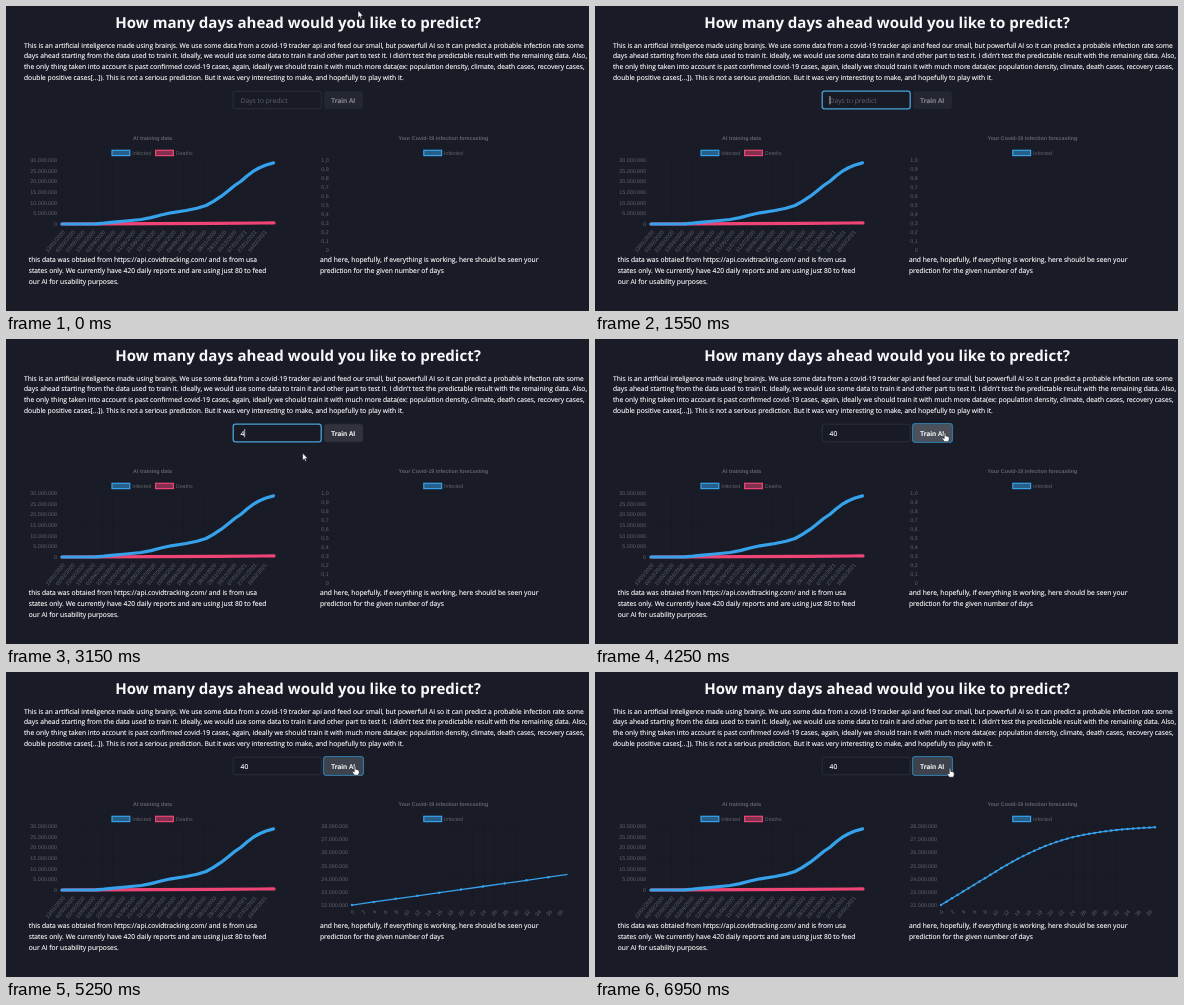
Recreate the animation shown at these times as an HTML page. Size 583 by 305 pixels, loop 7000 ms.

```html
<!DOCTYPE html>
<html lang="en">
<head>
<meta charset="utf-8">
<title>Infection forecast</title>
<style>
  html, body { margin: 0; width: 100%; height: 100%; overflow: hidden; background: #191c27; }
  svg { display: block; width: 583px; height: 305px; text-rendering: geometricPrecision; }
  text { white-space: pre; }
  .copy { font: 6.71px "Open Sans", "Noto Sans", sans-serif; fill: #fff; stroke: #fff; stroke-width: .12; }
  .copy.hint { fill: #62646c; stroke: none; }
  .head { font: 700 15.05px "Open Sans", "Noto Sans", sans-serif; fill: #f8f8fa; }
  .btn { font: 600 6.55px "Open Sans", "Noto Sans", sans-serif; stroke-width: .15; }
  .chart { font: 5.34px "Liberation Sans", Arial, sans-serif; fill: #61636a; }
  .chart .title { font-weight: 700; }
  .end { text-anchor: end; }
  .mid { text-anchor: middle; }
  .line { fill: none; stroke-linejoin: round; stroke-linecap: round; }
  .blue { stroke: #36a2eb; }
  .pink { stroke: #ee4576; }
  .grid { stroke: #000; stroke-opacity: .12; stroke-width: .5; }
  .pointer path { fill: #fff; stroke: #101116; stroke-width: .6; stroke-linejoin: round; }
</style>
</head>
<body>
<svg viewBox="0 0 583 305" xmlns="http://www.w3.org/2000/svg">
  <defs><clipPath id="area"><rect x="343" y="150" width="218.5" height="86"/></clipPath></defs>
  <rect width="583" height="305" fill="#191c27"/>
  <text class="head mid" x="292.1" y="21.6">How many days ahead would you like to predict?</text>
  <g id="copy" class="copy"></g>

  <g id="form">
    <rect id="field" x="227.2" y="85.2" width="88" height="17.6" rx="2.3" fill="#181b25"/>
    <text id="value" class="copy" x="234.6" y="97"></text>
    <rect id="caret" y="90" width=".7" height="8.4" fill="#eee"/>
    <rect id="button" x="318.2" y="85.2" width="38.6" height="17.6" rx="2.3"/>
    <rect id="ring" class="line" x="317.6" y="84.6" width="39.8" height="18.8" rx="2.8" stroke="#34759f" stroke-width="1.3"/>
    <text id="label" class="btn mid" x="337.3" y="96.7">Train AI</text>
  </g>

  <g id="left" class="chart">
    <text class="title mid" x="146.5" y="133.9">AI training data</text>
  </g>
  <g id="right" class="chart">
    <text class="title mid" x="437.4" y="133.9">Your Covid-19 infection forecasting</text>
    <g id="empty"></g>
    <g id="forecast"></g>
    <g id="series" clip-path="url(#area)">
      <path id="curve" class="line blue" stroke-width="1.3"/>
      <g id="dots" fill="#36a2eb"></g>
    </g>
  </g>

  <g id="pointer" class="pointer">
    <path id="arrow" d="M0 0V7.4L1.7 5.9L2.8 8.4L4 7.9L2.9 5.4H5.2Z"/>
    <path id="hand" d="M-.8 .6Q0 -.5 .8 .6V3.2Q1.5 2.8 1.9 3.5Q2.7 3.1 3.1 3.9Q4 3.6 4.2 4.5V6.6L3.4 8.9H-.7L-2.9 5.6Q-2.7 4.5 -1.6 5.2L-.8 5.8Z"/>
    <path id="beam" d="M-1.2 -3.6H1.2M0 -3.6V3.6M-1.2 3.6H1.2"/>
  </g>
</svg>
<script>
const LOOP = 7000;
const $ = id => document.getElementById(id);

function add(parent, tag, attrs, text) {
  const el = document.createElementNS("http://www.w3.org/2000/svg", tag);
  for (const k in attrs) el.setAttribute(k, attrs[k]);
  if (text !== undefined) el.textContent = text;
  return parent.appendChild(el);
}

function set(el, attrs) {
  for (const k in attrs) el.setAttribute(k, attrs[k]);
}

function show(el, on) {
  el.style.display = on ? "" : "none";
}

function lines(x, y, rows) {
  rows.forEach((row, i) => add($("copy"), "text", { x, y: y + i * 10.68 }, row));
}

function legend(parent, x, color, name) {
  add(parent, "rect", {
    x, y: 144.3, width: 17.8, height: 5.3, class: color,
    fill: color === "blue" ? "#36a2eb" : "#ee4576", "fill-opacity": .5, "stroke-width": 1.2
  });
  add(parent, "text", { x: x + 20.2, y: 148.8 }, name);
}

// Tick labels down the side, each with a faint grid line
function yAxis(parent, x, right, gap, names) {
  names.forEach((name, i) => {
    const y = 154 + i * gap;
    add(parent, "path", { class: "grid", d: `M${x + 1.5} ${y}H${right}` });
    add(parent, "text", { x, y: y + 1.9, class: "end" }, name);
  });
}

function xTick(parent, x, bottom, drop, name) {
  add(parent, "path", { class: "grid", d: `M${x} 154V${bottom + 4}` });
  add(parent, "text", {
    class: "end", y: 1.9, transform: `translate(${x + 1.4} ${bottom + drop}) rotate(-50)`
  }, name);
}

const pathOf = pts => "M" + pts.map(p => p.map(v => v.toFixed(2)).join(" ")).join("L");
const millions = n => n ? n + ".000.000" : "0";

// Text blocks
lines(18, 41.6, [
  "This is an artificial inteligence made using brainjs. We use some data from a covid-19 tracker api and feed our small, but powerfull AI so it can predict a probable infection rate some",
  "days ahead starting from the data used to train it. Ideally, we would use some data to train it and other part to test it. I didn't test the predictable result with the remaining data. Also,",
  "the only thing taken into account is past confirmed covid-19 cases, again, ideally we should train it with much more data(ex: population density, climate, death cases, recovery cases,",
  "double positive cases[...]). This is not a serious prediction. But it was very interesting to make, and hopefully to play with it."
]);
lines(22.8, 256.4, [
  "this data was obtaied from https://api.covidtracking.com/ and is from usa",
  "states only. We currently have 420 daily reports and are using just 80 to feed",
  "our AI for usability purposes."
]);
lines(314, 256.4, [
  "and here, hopefully, if everything is working, here should be seen your",
  "prediction for the given number of days"
]);

// Training chart
const left = $("left");
legend(left, 106, "blue", "Infected");
legend(left, 149.6, "pink", "Deaths");
yAxis(left, 51, 268, 10.65, [30, 25, 20, 15, 10, 5, 0].map(millions));
for (let i = 0; i <= 20; i++) {
  const day = new Date(Date.UTC(2020, 0, 13 + i * 20)).toISOString().slice(0, 10);
  xTick(left, 56.2 + i * 10.1, 218, 7, day.split("-").reverse().join("/"));
}
add(left, "path", { class: "line pink", "stroke-width": 3.2, d: "M56 218L95 217.9L150 217.6L210 217.4L268 216.9" });
add(left, "path", {
  class: "line blue", "stroke-width": 3.2,
  d: pathOf([[56, 218], [90, 217.9], [98, 217.2], [108, 216.1], [120, 215], [135, 213.5], [145, 211.6],
    [155, 209], [165, 206.8], [180, 204.5], [191, 202.3], [200, 199.5], [207, 195.7], [215, 190.4],
    [222, 185], [229, 179.3], [235, 175.2], [241, 170], [247, 165.4], [253, 162], [260, 159], [267.5, 156.9]])
});

// Forecast chart
const POINTS = 40, X0 = 346, SPAN = 214, STEP = SPAN / (POINTS - 1), BASE = 233.4;
const knots = [233, 219.6, 206.2, 192.9, 181.3, 172, 165.2, 160.9, 158, 156.2, 155];

function level(i) {
  const k = Math.min(Math.floor(i / 4), knots.length - 2), u = i / 4 - k;
  const b = knots[k], c = knots[k + 1];
  const a = k ? knots[k - 1] : 2 * b - c;
  const d = knots[k + 2] ?? c - .8;
  return b + .5 * u * (c - a + u * (2 * a - 5 * b + 4 * c - d + u * (3 * (b - c) + d - a)));
}

const levels = Array.from({ length: POINTS }, (_, i) => level(i));
const dots = levels.map(() => add($("dots"), "circle", { r: 1.25 }));
legend($("right"), 417.8, "blue", "Infected");
yAxis($("empty"), 322.7, 560, 9, Array.from({ length: 11 }, (_, i) =>
  i < 10 ? (1 - i / 10).toFixed(1).replace(".", ",") : "0"));
yAxis($("forecast"), 342, 560, 13.25, [28, 27, 26, 25, 24, 23, 22].map(millions));
for (let i = 0; i < POINTS; i += 2) xTick($("forecast"), X0 + i * STEP, 233.5, 5.2, i);

// Timeline in ms
const FOCUS = 1450, TYPE_4 = 3100, TYPE_0 = 3300, PRESS = 4200, RELEASE = 4400, DRAW = 4780;
const track = [[0, 352, 4.5], [350, 352, 4.5], [800, 345, 12], [1350, 256, 94], [2250, 256, 94],
  [2800, 296.6, 114], [3450, 296.6, 114], [3950, 350, 93.8], [4450, 350, 93.8], [5250, 349, 94.3],
  [5650, 348.2, 94.3], [6650, 348.2, 94.3], [6900, 355, 96.3], [LOOP, 355, 96.3]];

function pointerAt(t) {
  const n = Math.max(1, track.findIndex(k => k[0] > t));
  const [t0, x0, y0] = track[n - 1], [t1, x1, y1] = track[n];
  const u = (t - t0) / (t1 - t0), e = u * u * (3 - 2 * u);
  return [x0 + (x1 - x0) * e, y0 + (y1 - y0) * e];
}

function drawForm(t, overButton) {
  const typed = t >= TYPE_0 ? "40" : t >= TYPE_4 ? "4" : "";
  const focused = t >= FOCUS && t < PRESS, clicked = t >= PRESS;
  set($("field"), { stroke: focused ? "#4aa3d8" : "#303440", "stroke-width": focused ? 1.3 : .8 });
  $("value").textContent = typed || "Days to predict";
  $("value").classList.toggle("hint", !typed);
  const since = t - (t >= TYPE_0 ? TYPE_0 : t >= TYPE_4 ? TYPE_4 : FOCUS);
  show($("caret"), focused && since % 1000 < 500);
  $("caret").setAttribute("x", 234.6 + typed.length * 3.82);
  const fill = !typed ? "#242732" : clicked && t < RELEASE ? "#4b505b" : overButton ? "#3d424d" : "#30333e";
  set($("button"), { fill, stroke: fill, "stroke-width": .6 });
  show($("ring"), clicked);
  const ink = typed ? "#fff" : "#8b8d94";
  set($("label"), { fill: ink, stroke: ink });
}

function drawForecast(t) {
  const ready = t >= DRAW;
  show($("empty"), !ready);
  show($("forecast"), ready);
  show($("series"), ready);
  if (!ready) return;
  // Points slide in from the right and rise from the base line
  const rest = Math.pow(1 - Math.min(1, (t - DRAW) / 1000), 4);
  const gap = STEP + (SPAN - STEP) * rest;
  const pts = levels.map((y, i) => [X0 + i * gap, y + (BASE - y) * rest]);
  $("curve").setAttribute("d", pathOf(pts));
  pts.forEach(([cx, cy], i) => set(dots[i], { cx, cy }));
}

function frame() {
  const t = performance.now() % LOOP;
  const [x, y] = pointerAt(t);
  const overField = x > 227 && x < 316 && y > 85 && y < 103;
  const overButton = x > 318 && x < 357 && y > 85 && y < 103;
  show($("beam"), overField);
  show($("hand"), overButton);
  show($("arrow"), !overField && !overButton);
  $("pointer").setAttribute("transform", `translate(${x} ${y})`);
  drawForm(t, overButton);
  drawForecast(t);
  requestAnimationFrame(frame);
}
frame();
</script>
</body>
</html>
```
